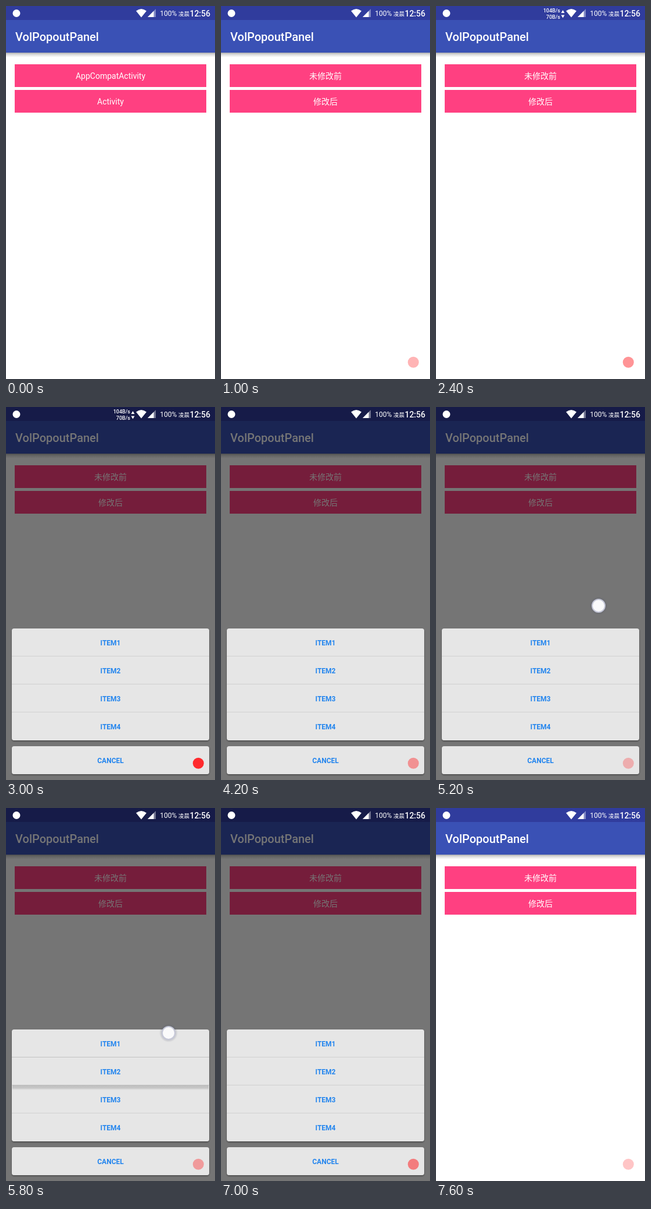
Animation of 360 by 640 pixels, one loop 8000 ms. Source, as an HTML page:

```html
<!DOCTYPE html>
<html lang="zh">
<head>
<meta charset="utf-8">
<title>Bottom sheet demo</title>
<style>
html, body { margin: 0; width: 100%; height: 100%; overflow: hidden; background: #fff; }
svg { display: block; width: 360px; height: 640px; font-family: Roboto, "Noto Sans CJK SC", "Noto Sans CJK", sans-serif; }
.mid { text-anchor: middle; }
.btn { font-size: 14px; fill: #fff; }
.item { font-size: 12px; font-weight: 600; fill: #2385ee; }
.speed { font-size: 9px; font-weight: 500; text-anchor: end; }

/* every state change is a hard cut */
.home, .detail, .net, .sheet, .touch, .lift, .dot { animation: 8s step-end infinite; }
.home { animation-name: home; }
.detail { animation-name: detail; }
.net { animation-name: net; }
.sheet { animation-name: sheet; }
.press { animation-name: press; }
.drag { animation-name: drag; }
.lift { animation-name: lift; }
.dot { animation-name: pulse; }
@keyframes home { 0% { opacity: 1 } 5%, 100% { opacity: 0 } }
@keyframes detail { 0% { opacity: 0 } 5%, 100% { opacity: 1 } }
@keyframes net { 0% { opacity: 0 } 30% { opacity: 1 } 45%, 100% { opacity: 0 } }
@keyframes sheet { 0% { opacity: 0 } 37.5% { opacity: 1 } 95%, 100% { opacity: 0 } }
@keyframes press { 0% { opacity: 0 } 60% { opacity: 1 } 65%, 100% { opacity: 0 } }
@keyframes drag {
  0% { opacity: 0; transform: translate(280px, 341px) }
  65% { opacity: 1; transform: translate(280px, 341px) }
  72.5% { opacity: 1; transform: translate(280px, 386px) }
  80%, 100% { opacity: 0; transform: translate(280px, 386px) }
}
@keyframes lift { 0% { opacity: 0 } 72.5% { opacity: 1 } 80%, 100% { opacity: 0 } }
@keyframes pulse {
  0% { opacity: 0 } 5% { opacity: .6 } 12.5% { opacity: .35 } 22.5% { opacity: .4 }
  30% { opacity: .5 } 37.5% { opacity: 1 } 45% { opacity: .7 } 52.5% { opacity: .45 }
  60% { opacity: .2 } 65% { opacity: .3 } 72.5% { opacity: .4 } 80% { opacity: .5 }
  87.5% { opacity: .56 } 95%, 100% { opacity: .27 }
}
</style>
</head>
<body>
<svg viewBox="0 0 360 640">
  <defs>
    <linearGradient id="shade" x2="0" y2="1">
      <stop stop-color="#000" stop-opacity=".32"/>
      <stop offset=".4" stop-color="#000" stop-opacity=".14"/>
      <stop offset="1" stop-color="#000" stop-opacity="0"/>
    </linearGradient>
    <linearGradient id="under" x2="0" y2="1">
      <stop stop-color="#bdbdbd"/>
      <stop offset=".6" stop-color="#c6c6c6"/>
      <stop offset="1" stop-color="#e6e6e6"/>
    </linearGradient>
    <radialGradient id="halo">
      <stop offset=".65" stop-color="#50566e" stop-opacity=".6"/>
      <stop offset="1" stop-color="#50566e" stop-opacity="0"/>
    </radialGradient>
    <filter id="soft" x="-5%" y="-10%" width="110%" height="125%">
      <feDropShadow dx="0" dy="1.5" stdDeviation="1.2" flood-opacity=".4"/>
    </filter>
  </defs>

  <rect width="360" height="640" fill="#fff"/>
  <rect y="80" width="360" height="8" fill="url(#shade)"/>
  <rect y="24" width="360" height="56" fill="#3a51b5"/>
  <rect width="360" height="24" fill="#303c9d"/>
  <text x="16" y="59.5" font-size="20" font-weight="500" fill="#fff">VolPopoutPanel</text>
  <path d="M15 100h330v39H15zM15 144h330v39H15z" fill="#ff4081"/>
  <g class="home btn mid">
    <text x="180" y="125">AppCompatActivity</text>
    <text x="180" y="169">Activity</text>
  </g>
  <g class="detail btn mid">
    <text x="180" y="125">未修改前</text>
    <text x="180" y="169">修改后</text>
  </g>

  <g class="sheet">
    <rect width="360" height="640" fill="#000" opacity=".54"/>
    <g fill="#e6e6e6" filter="url(#soft)">
      <rect x="10" y="380" width="340" height="192" rx="4"/>
      <rect x="10" y="582" width="340" height="48" rx="4"/>
    </g>
    <path d="M10 427.5h340M10 475.5h340M10 523.5h340" stroke="#d0d0d0"/>
    <g class="lift">
      <rect x="11" y="475" width="338" height="9" fill="url(#under)"/>
      <path d="M10 427.5h340" stroke="#c2c2c2"/>
    </g>
    <g class="item mid">
      <text x="180" y="409">ITEM1</text>
      <text x="180" y="457">ITEM2</text>
      <text x="180" y="505">ITEM3</text>
      <text x="180" y="553">ITEM4</text>
      <text x="180" y="611" font-weight="700">CANCEL</text>
    </g>
  </g>

  <g class="touch press">
    <circle cx="280" cy="297" r="16.5" fill="#7c7f86"/>
    <circle cx="280.3" cy="297.3" r="10.5" fill="#a5a8ab"/>
  </g>
  <g class="touch drag">
    <circle r="16" fill="url(#halo)" opacity=".5"/>
    <circle r="11" fill="#fafafb" stroke="#c6c8d8" stroke-width="2"/>
  </g>

  <g fill="#fff">
    <circle cx="18" cy="12.5" r="6.5"/>
    <g class="net">
      <text class="speed" x="214" y="10.5">104B/s</text>
      <text class="speed" x="214" y="22">70B/s</text>
      <path d="M215.5 12l3-5 3 5zM215.5 15.500h6l-3 5z"/>
    </g>
    <path d="M233 19.500L224 8.500Q233 1.500 242 8.500Z"/>
    <path d="M244 19L258 5V19Z" opacity=".4"/>
    <path d="M244 19L254.500 8.500V19Z"/>
    <text x="265.3" y="17" font-size="12">100%</text>
    <text x="297" y="17" font-size="9.500">凌晨</text>
    <text x="352" y="17.500" font-size="14" font-weight="500" text-anchor="end">12:56</text>
  </g>
  <circle class="dot" cx="331.3" cy="611.3" r="9.500" fill="#ff2a2d"/>
</svg>
</body>
</html>
```
